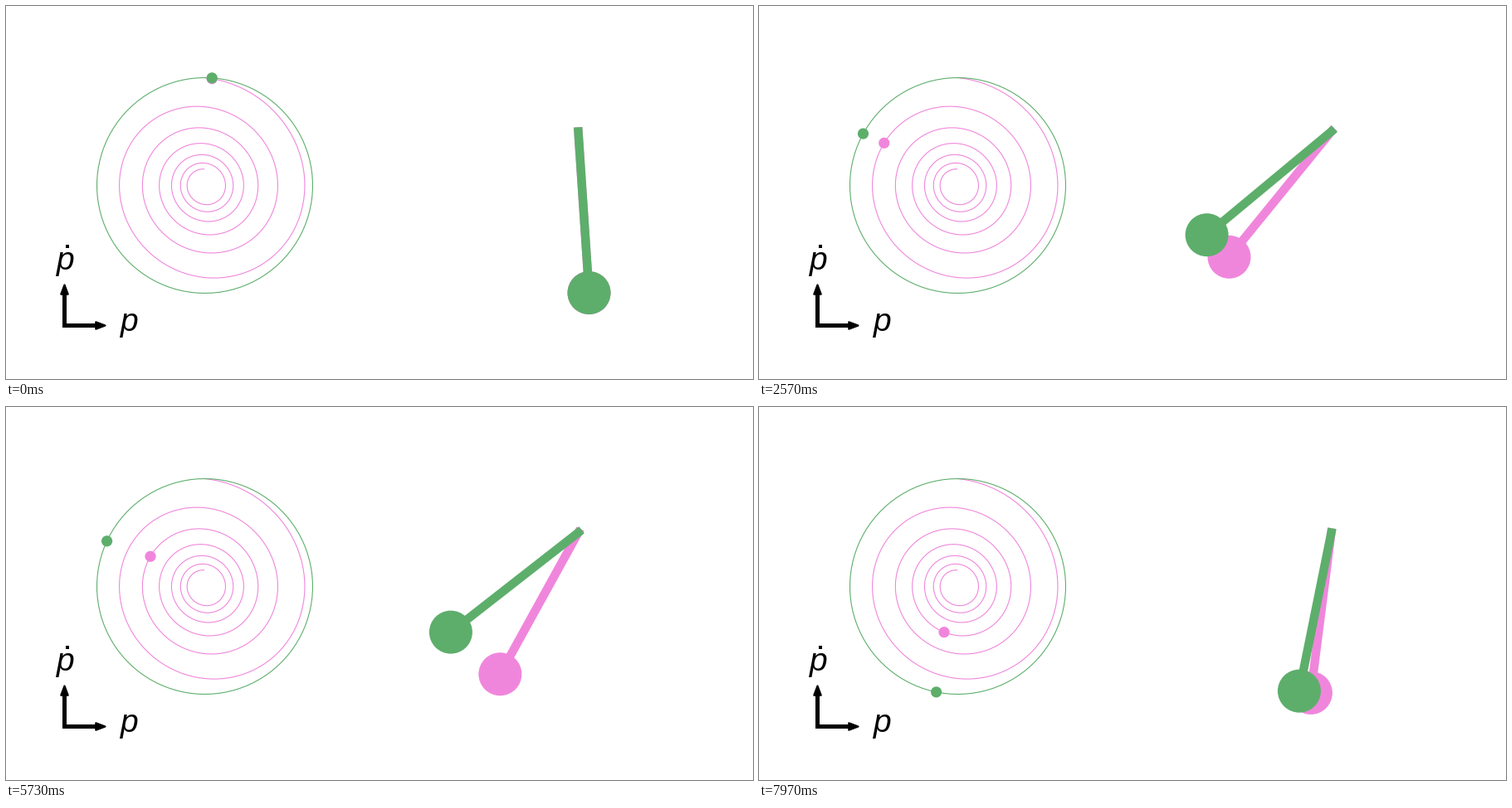
Recreate the animation shown at these times as a matplotlib script. Size 900 by 450 pixels, loop 8 s.

```python
import numpy as np
import matplotlib.pyplot as plt
from matplotlib.animation import FuncAnimation
from matplotlib.patches import Circle, Polygon, Rectangle

W, H, DPI = 900, 450, 100
FRAMES, LOOP_MS = 240, 8000
GREEN, PINK = "#5dae6b", "#f086dc"
PX = 72 / DPI                    # one pixel in points

SCALE = 130                      # pixels per unit
CENTER = np.array([239.5, 216.5])
PIVOT = np.array([689.5, 151.5])
LENGTH = 1.5 * SCALE
GAMMA = 0.05
OMEGA = np.sqrt(1 - GAMMA ** 2)

T_FREE = np.linspace(0, 2 * np.pi, 95)
T_DAMPED = np.linspace(0, 12 * np.pi, 566)


def free(t):
    """Position and velocity of the undamped oscillator."""
    return np.sin(t), np.cos(t)


def damped(t):
    """Position and velocity of the damped oscillator."""
    decay = np.exp(-GAMMA * t)
    s, c = np.sin(OMEGA * t), np.cos(OMEGA * t)
    return decay * s / OMEGA, decay * (c - GAMMA * s / OMEGA)


def phase_xy(p, v):
    return CENTER[0] + SCALE * p, CENTER[1] - SCALE * v


fig = plt.figure(figsize=(W / DPI, H / DPI), dpi=DPI, facecolor="white")
ax = fig.add_axes([0, 0, 1, 1])
ax.set_xlim(0, W)
ax.set_ylim(H, 0)
ax.axis("off")


class Oscillator:
    """Phase curve with its marker, and the matching pendulum."""

    def __init__(self, motion, times, color, z):
        self.motion, self.times = motion, times
        ax.plot(*phase_xy(*motion(times)), color=color, lw=1.1 * PX, zorder=z)
        self.dot = ax.add_patch(
            Circle(CENTER, 6.6, fc=color, lw=0, zorder=z + 4))
        self.rod, = ax.plot([], [], color=color, lw=10.4 * PX, snap=False,
                            solid_capstyle="projecting", zorder=z + 4)
        self.bob = ax.add_patch(
            Circle(PIVOT, 26, fc=color, lw=0, zorder=z + 4.5))

    def update(self, step):
        p, v = self.motion(self.times[step % len(self.times)])
        self.dot.center = phase_xy(p, v)
        end = PIVOT + LENGTH * np.array([np.sin(p), np.cos(p)])
        self.rod.set_data(*zip(PIVOT, end))
        self.bob.center = end
        return self.dot, self.rod, self.bob


def axis_arrow(origin, direction):
    o, d = np.array(origin), np.array(direction)
    n = np.array([-d[1], d[0]])
    shaft = [o - 2.5 * d - 2.5 * n, o - 2.5 * d + 2.5 * n,
             o + 40 * d + 2.5 * n, o + 40 * d - 2.5 * n]
    head = [o + 37.8 * d - 4.2 * n, o + 49 * d, o + 37.8 * d + 4.2 * n]
    ax.add_patch(Polygon(shaft, fc="black", lw=0))
    ax.add_patch(Polygon(head, fc="black", ec="black", lw=2.2 * PX,
                         joinstyle="round"))


def label(x, y):
    ax.text(x, y, "p", family="Liberation Sans", style="italic", size=28,
            ha="left", va="baseline")


pendulums = [Oscillator(damped, T_DAMPED, PINK, 2),
             Oscillator(free, T_FREE, GREEN, 3)]

axis_arrow((70.5, 385.5), (1, 0))
axis_arrow((70.5, 385.5), (0, -1))
label(138, 392)
label(61, 318)
ax.add_patch(Rectangle((72.3, 288), 4, 4, fc="black", lw=0))


def draw(frame):
    return [a for pend in pendulums for a in pend.update(frame + 1)]


anim = FuncAnimation(fig, draw, frames=FRAMES, interval=LOOP_MS / FRAMES,
                     init_func=lambda: draw(0), repeat=True, repeat_delay=0)
plt.show()
```
